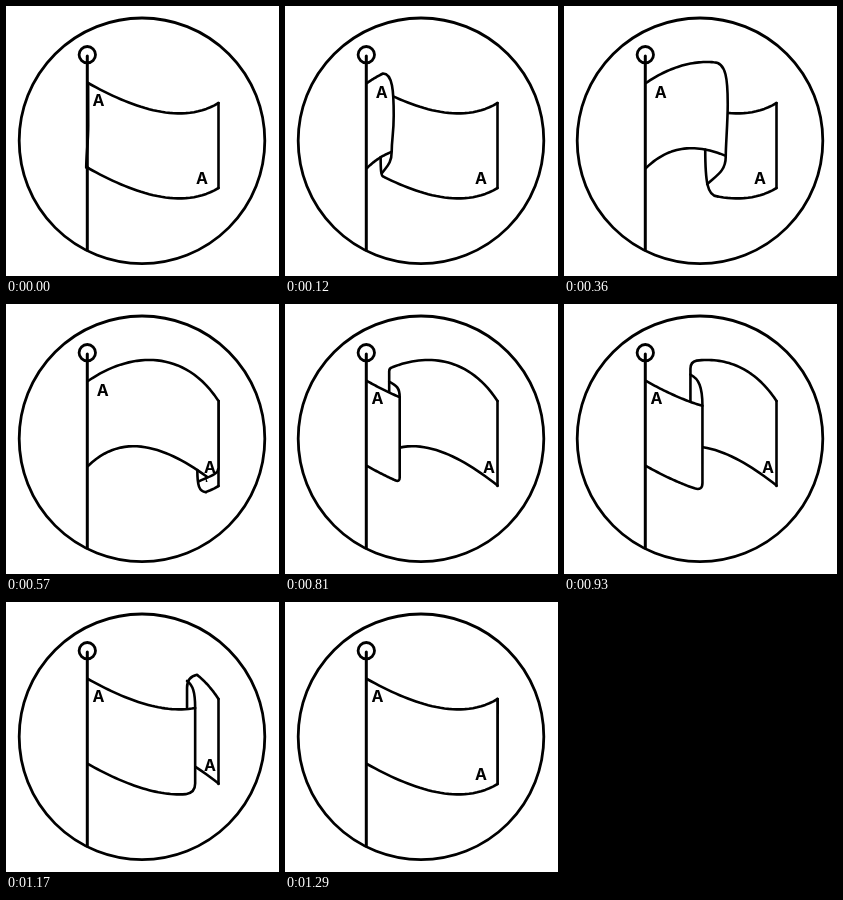
An HTML page with a canvas for the animation above (1320 ms loop, 273 by 270 pixels).

```html
<!DOCTYPE html>
<html lang="en">
<head>
<meta charset="utf-8">
<title>Waving flag</title>
<style>
html, body { margin: 0; width: 100%; height: 100%; overflow: hidden; background: #fff; }
canvas { display: block; width: 273px; height: 270px; }
</style>
</head>
<body>
<canvas id="stage"></canvas>
<script>
const canvas = document.getElementById('stage');
const g = canvas.getContext('2d');
const ratio = window.devicePixelRatio || 1;
canvas.width = 273 * ratio;
canvas.height = 270 * ratio;

const LOOP = 1320, TURN = 640;
const LEFT = 82, RIGHT = 212.5;

// Cubic edges of the two cloth poses, as [x, y] control points
const sagTop = [[LEFT, 77], [125, 101], [175, 120], [RIGHT, 97]];
const sagBottom = sagTop.map(([x, y]) => [x, y + 85]);
const archTop = [[LEFT, 77], [124, 48], [178, 44], [RIGHT, 97]];
const archBottom = [[LEFT, 162], [117, 128], [160, 140], [RIGHT, 181.5]];
const sag = { top: sagTop, bottom: sagBottom, marks: [[92.5, 94.5], [196, 172]] };
const arch = { top: archTop, bottom: archBottom, marks: [[96.8, 86], [204, 163]] };

// Time and x of the leading fold and of the trailing curl
const archFold = [[0, LEFT], [240, 135], [360, 163.5], [565, RIGHT]];
const archCurl = [[50, LEFT], [240, 118.5], [360, 141], [570, 191], [635, RIGHT]];
const sagFold = [[TURN, LEFT], [810, 114.5], [1050, 162], [1275, RIGHT]];
const sagCurl = [[680, LEFT], [810, 104], [1050, 148.5], [1288, RIGHT]];

function at(keys, t) {
  if (t <= keys[0][0]) return keys[0][1];
  for (let i = 1; i < keys.length; i++) {
    const [t0, v0] = keys[i - 1], [t1, v1] = keys[i];
    if (t <= t1) return v0 + (v1 - v0) * (t - t0) / (t1 - t0);
  }
  return keys[keys.length - 1][1];
}

function bez(c, u, k) {
  const v = 1 - u;
  return v * v * v * c[0][k] + 3 * v * v * u * c[1][k] + 3 * v * u * u * c[2][k] + u * u * u * c[3][k];
}

function yAt(c, x) {
  let lo = 0, hi = 1;
  for (let i = 0; i < 22; i++) {
    const mid = (lo + hi) / 2;
    if (bez(c, mid, 0) < x) lo = mid; else hi = mid;
  }
  return bez(c, (lo + hi) / 2, 1);
}

function follow(c, x0, x1) {
  for (let i = 0; i <= 32; i++) {
    const x = x0 + (x1 - x0) * i / 32;
    g.lineTo(x, yAt(c, x));
  }
}

function stroke(path) {
  g.beginPath();
  path();
  g.stroke();
}

function fill(path) {
  g.beginPath();
  path();
  g.closePath();
  g.fillStyle = '#fff';
  g.fill();
}

function within(path, draw) {
  g.save();
  g.beginPath();
  path();
  g.clip();
  draw();
  g.restore();
}

const rightOf = x => () => g.rect(x, 0, 300, 270);

function letters(pose) {
  g.fillStyle = '#000';
  for (const [x, y] of pose.marks) g.fillText('A', x, y + 5.8);
}

function side() {
  g.moveTo(RIGHT, 97);
  g.lineTo(RIGHT, 182);
}

// The arch rolls over the sagging cloth
function rollArch(F, L) {
  const start = L - LEFT, rest = RIGHT - L, ahead = RIGHT - F;
  const c = Math.min(start * 0.2, rest * 0.4);
  const r = Math.min(14, (F - LEFT) * 0.4, ahead * 0.6);
  const y = yAt(archTop, F - r);
  const bulge = Math.min(2, ahead * 0.1);
  const dip = Math.min(yAt(archBottom, F), Math.max(163, 181 - rest * 0.82));
  const endX = L + Math.min(2, start * 0.1, rest * 0.1);
  const endY = yAt(sagBottom, L) - Math.min(14, start * 0.16, rest * 0.63);
  const h = endY - dip;
  const curlY = yAt(archBottom, L);
  const hemY = yAt(sagBottom, L + c);

  const fold = () => {
    g.moveTo(LEFT, 77);
    follow(archTop, LEFT, F - r);
    g.bezierCurveTo(F - r * 0.1, y, F, y + 18, F, y + 42);
    g.bezierCurveTo(F, y + 60, F - bulge, dip - 12, F - bulge, dip);
    g.bezierCurveTo(F - bulge, dip + h * 0.55,
      endX + (F - endX) * 0.4, endY - h * 0.3, endX, endY);
  };

  within(rightOf(L + c), () => {
    stroke(() => follow(sagTop, LEFT, RIGHT));
    stroke(() => follow(sagBottom, LEFT, RIGHT));
    stroke(side);
    letters(sag);
  });
  fill(() => { fold(); follow(archBottom, L, LEFT); });
  within(() => { fold(); g.lineTo(LEFT, 260); g.closePath(); }, () => {
    stroke(() => follow(archBottom, LEFT, F));
    letters(arch);
  });
  stroke(fold);
  stroke(() => {
    g.moveTo(L, curlY);
    g.bezierCurveTo(L, curlY + (hemY - curlY) * 0.7, L + c * 0.2, hemY - 0.5, L + c, hemY);
  });
}

// The sagging cloth slides in front of the arch
function rollSag(F, L) {
  const start = L - LEFT;
  const r = Math.min(12, (F - LEFT) * 0.14, (RIGHT - F) * 0.4);
  const k = Math.min(10, start * 0.14, (RIGHT - L) * 0.4);
  const y = yAt(archTop, L + k);
  const innerY = yAt(archTop, L) + Math.min(13, start * 0.6);
  const foldY = yAt(sagTop, F), hemY = yAt(sagBottom, F);

  stroke(() => {
    g.moveTo(L, Math.max(y + k * 1.3, yAt(sagTop, L)));
    g.lineTo(L, y + k * 1.3);
    g.quadraticCurveTo(L, y + k * 0.2, L + k, y);
    follow(archTop, L + k, RIGHT);
  });
  stroke(side);
  within(rightOf(F), () => {
    stroke(() => follow(archBottom, LEFT, RIGHT));
    letters(arch);
  });
  stroke(() => {
    g.moveTo(L, innerY);
    g.bezierCurveTo(L + (F - L) * 0.7, innerY + 4, F, innerY + (foldY - innerY) * 0.4, F, foldY);
  });

  const front = () => {
    g.moveTo(LEFT, 77);
    follow(sagTop, LEFT, F);
    g.lineTo(F, hemY - r);
    g.quadraticCurveTo(F, hemY, F - r, yAt(sagBottom, F - r));
    follow(sagBottom, F - r, LEFT);
  };
  fill(front);
  within(front, () => letters(sag));
  stroke(front);
}

function frame() {
  const t = performance.now() % LOOP;
  g.setTransform(ratio, 0, 0, ratio, 0, 0);
  g.fillStyle = '#fff';
  g.fillRect(0, 0, 273, 270);
  g.strokeStyle = '#000';
  g.lineWidth = 2.6;
  g.lineCap = g.lineJoin = 'round';
  g.font = '700 16px Inter, sans-serif';
  g.textAlign = 'center';

  if (t < TURN) rollArch(at(archFold, t), at(archCurl, t));
  else rollSag(at(sagFold, t), at(sagCurl, t));

  g.lineWidth = 2.8;
  stroke(() => g.arc(136, 134.8, 122.8, 0, 7));
  stroke(() => g.arc(81.3, 48.7, 8.2, 0, 7));
  g.lineWidth = 3;
  stroke(() => { g.moveTo(81.3, 50); g.lineTo(81.3, 244); });
  requestAnimationFrame(frame);
}
frame();
</script>
</body>
</html>
```
